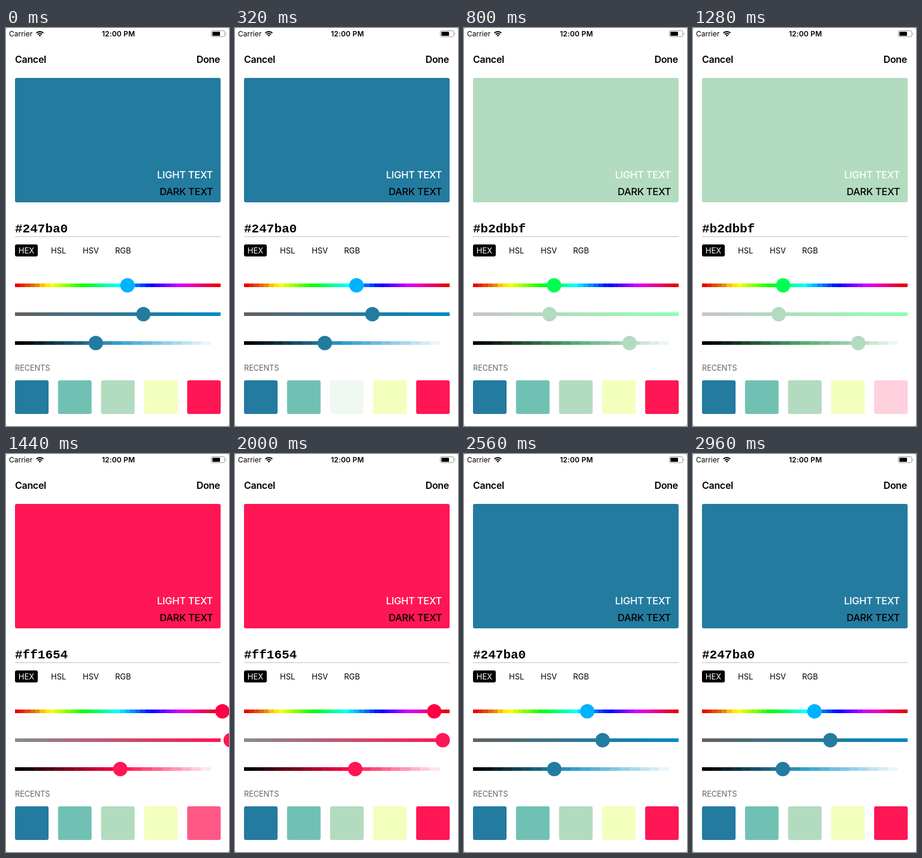
An HTML page for the animation above (3000 ms loop, 372 px wide and 662 px high).

```html
<!DOCTYPE html>
<html lang="en">
<head>
<meta charset="utf-8">
<title>Color picker</title>
<style>
  html, body { margin: 0; width: 100%; height: 100%; overflow: hidden; background: #fff; }
  svg { display: block; width: 372px; height: 662px; font-family: Inter, Roboto, sans-serif; }
  .nav { font-size: 16px; font-weight: 600; letter-spacing: -.3px; }
  .sample { font-size: 16.5px; font-weight: 500; letter-spacing: -.3px; }
  .status { font-size: 12px; }
  .tab { font-size: 13px; }
  .hex { font: bold 21px "Liberation Mono", "Courier New", monospace; }
  .end { text-anchor: end; }
  .mid { text-anchor: middle; }
</style>
</head>
<body>
<svg id="stage" viewBox="0 0 372 662">
  <rect width="372" height="662" fill="#999"/>
  <rect width="372" height="662" rx="3" fill="#fff"/>

  <text class="status" x="5" y="13.5">Carrier</text>
  <g fill="none" stroke="#000" stroke-width="2">
    <path d="M50.7 8.2a8.4 8.4 0 0 1 11.6 0"/>
    <path d="M53 10.7a5 5 0 0 1 7 0"/>
  </g>
  <path d="M56.5 14.3l-2-2.1a2.9 2.9 0 0 1 4 0z"/>
  <text class="status mid" x="187.5" y="13.5" font-weight="600" letter-spacing=".15">12:00 PM</text>
  <rect x="342.5" y="4.5" width="22.5" height="10" rx="2.5" fill="none" stroke="#999"/>
  <rect x="344.3" y="6.2" width="12.7" height="6.8" rx="1"/>
  <path d="M366.5 7.5q2 2 0 4z" fill="#999"/>

  <text class="nav" x="15" y="57.5">Cancel</text>
  <text class="nav end" x="357" y="57.5">Done</text>

  <rect id="card" x="15" y="83" width="343" height="207" rx="3"/>
  <text class="sample end" x="345" y="249.7" fill="#fff">LIGHT TEXT</text>
  <text class="sample end" x="345.3" y="277.7">DARK TEXT</text>

  <text id="hex" class="hex" x="15" y="340"></text>
  <rect x="15" y="346" width="343" height="2" fill="#dcdcdc"/>

  <rect x="15" y="360" width="38" height="20" rx="3"/>
  <text class="tab mid" x="34" y="375" fill="#fff">HEX</text>
  <text class="tab" x="75" y="375">HSL</text>
  <text class="tab" x="128" y="375">HSV</text>
  <text class="tab" x="182" y="375">RGB</text>

  <g id="sliders"></g>
  <text x="15" y="570" font-size="12.8" letter-spacing="-.1" fill="#666">RECENTS</text>
  <g id="swatches"></g>
</svg>
<script>
const LOOP = 3000;
const RECENTS = ['#247ba0', '#70c1b3', '#b2dbbf', '#f3ffbd', '#ff1654'];
// Each tap: index of the swatch and the moment of release.
const TAPS = [{ swatch: 2, at: 326 }, { swatch: 4, at: 1306 }, { swatch: 0, at: 2290 }];
const PRESS = 105, FADE_DELAY = 28, FADE = 180, PRESSED_ALPHA = 0.2;
const LAGS = [0, 10, 13];
const BAR = { x: 14.5, width: 343.5, height: 6 };
const THUMB = 12;

const $ = id => document.getElementById(id);

function add(parent, tag, attrs) {
  const node = document.createElementNS('http://www.w3.org/2000/svg', tag);
  set(node, attrs);
  parent.append(node);
  return node;
}

function set(node, attrs) {
  for (const key in attrs) node.setAttribute(key, attrs[key]);
}

function toHsl(hex) {
  const [r, g, b] = [1, 3, 5].map(i => parseInt(hex.slice(i, i + 2), 16) / 255);
  const max = Math.max(r, g, b), min = Math.min(r, g, b), d = max - min;
  const l = (max + min) / 2;
  const h = max === r ? (g - b) / d + 6 : max === g ? (b - r) / d + 2 : (r - g) / d + 4;
  return [(h % 6) / 6, d / (1 - Math.abs(2 * l - 1)), l];
}

const hsl = (h, s, l) => `hsl(${h * 360}, ${s * 100}%, ${l * 100}%)`;
const COLORS = RECENTS.map(toHsl);

const sliders = [41, 21, 21].map((count, row) => {
  const y = 428 + row * 48, step = BAR.width / count;
  const cells = Array.from({ length: count }, (_, i) => add($('sliders'), 'rect', {
    x: BAR.x + i * step, y: y - BAR.height / 2,
    width: step, height: BAR.height, 'shape-rendering': 'crispEdges'
  }));
  return { cells, y };
});
const thumbs = sliders.map(({ y }) => add($('sliders'), 'circle', { cy: y, r: THUMB }));

const swatches = RECENTS.map((fill, i) => add($('swatches'), 'rect', {
  x: 15 + i * 71.8, y: 586, width: 56, height: 56, rx: 3, fill
}));

// Hue is dimmer around red and magenta.
const hueCell = v => hsl(v, 1, v < 0.11 || v > 0.81 ? 0.45 : 0.5);

function spring(ms) {
  if (ms <= 0) return 0;
  const omega = 0.025, decay = omega * 0.5, freq = omega * Math.sqrt(0.75);
  return 1 - Math.exp(-decay * ms) *
    (Math.cos(freq * ms) + decay / freq * Math.sin(freq * ms));
}

function alphaAfterRelease(ms) {
  if (ms < -PRESS) return 1;
  const p = Math.min(1, Math.max(0, (ms - FADE_DELAY) / FADE));
  return PRESSED_ALPHA + (1 - PRESSED_ALPHA) * p * p * (3 - 2 * p);
}

let shown = -1;
function showColor(index) {
  if (index === shown) return;
  shown = index;
  const [h, s, l] = COLORS[index], color = RECENTS[index];
  const paint = [hueCell, v => hsl(h, v, l), v => hsl(h, s, v)];
  set($('card'), { fill: color });
  $('hex').textContent = color;
  sliders.forEach(({ cells }, row) => cells.forEach((cell, i) =>
    set(cell, { fill: paint[row](i / (cells.length - 1)) })));
  thumbs.forEach((thumb, row) => set(thumb, { fill: row ? color : hsl(h, 1, 0.5) }));
}

function render(t) {
  let from = 0, to = 0, start = 0;
  for (const { swatch, at } of TAPS) {
    if (t >= at) [from, to, start] = [to, swatch, at];
    set(swatches[swatch], { opacity: alphaAfterRelease(t - at) });
  }
  showColor(to);
  thumbs.forEach((thumb, row) => {
    const a = COLORS[from][row], b = COLORS[to][row];
    const value = a + (b - a) * spring(t - start - LAGS[row]);
    set(thumb, { cx: BAR.x + THUMB + 0.5 + value * (BAR.width - 2 * THUMB) });
  });
}

const began = performance.now();
function tick() {
  render((performance.now() - began) % LOOP);
  requestAnimationFrame(tick);
}
tick();
</script>
</body>
</html>
```
